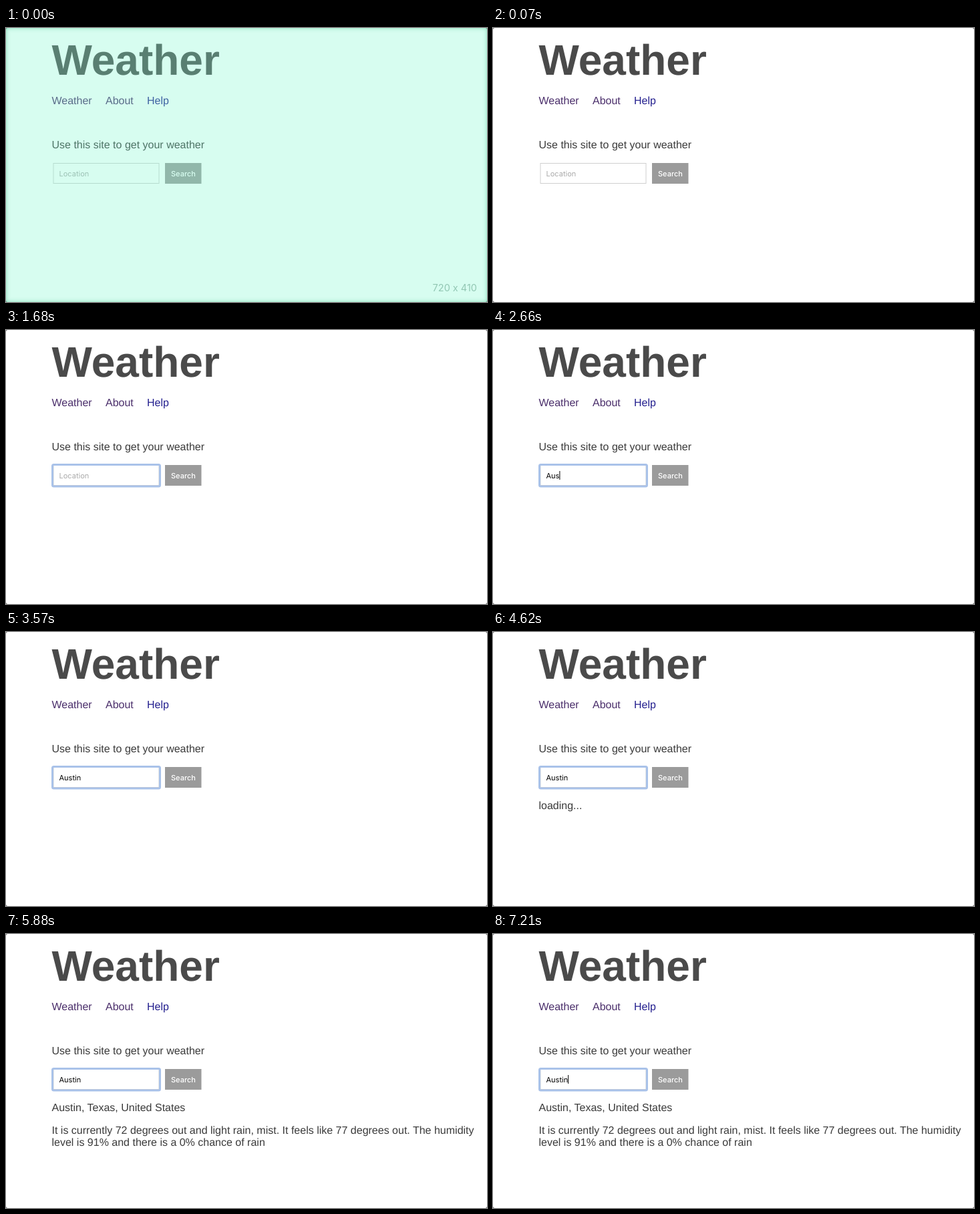
These frames come from a looping animation (720 px wide and 410 px high, 7.28 s). An HTML page:

```html
<!DOCTYPE html>
<html lang="en">
<head>
<meta charset="utf-8">
<title>Weather</title>
<style>
  html, body { margin: 0; width: 100%; height: 100%; overflow: hidden; background: #fff; }
  svg { position: absolute; left: 0; top: 0; display: block; }
  text { font: 16px "Liberation Sans", Arial, sans-serif; fill: #3a3a3a; text-rendering: geometricPrecision; }
  .title { font-size: 64px; font-weight: bold; fill: #4a4a4a; }
  .visited { fill: #4b2f6b; }
  .link { fill: #24208f; }
  .control { font: 11px Inter, sans-serif; }
  #flash {
    position: absolute; left: 0; top: 0; width: 720px; height: 410px;
    background: rgba(122, 248, 205, .3);
    box-shadow: inset 0 0 6px rgba(90, 205, 155, .65);
  }
  #flash span {
    position: absolute; right: 15px; top: 380px;
    font: 14.5px/18px Inter, sans-serif; color: #92c7b3;
  }
</style>
</head>
<body>
<svg width="720" height="410" viewBox="0 0 720 410">
  <path d="M0 0h2L0 2zM720 0v2l-2-2zM0 410v-2l2 2zM720 410h-2l2-2z" fill="#888"/>
  <text class="title" x="68.5" y="70">Weather</text>
  <text class="visited" x="68.5" y="114">Weather</text>
  <text class="visited" x="149" y="114">About</text>
  <text class="link" x="211" y="114">Help</text>
  <text x="68.5" y="180">Use this site to get your weather</text>

  <rect x="71" y="202.5" width="158" height="30" fill="#fff" stroke="#cfcfcf"/>
  <rect id="ring" fill="none" stroke="#a9c2e9" stroke-width="3"/>
  <text id="field" class="control" x="79.5" y="222"></text>
  <rect id="caret" y="211" width="1" height="13" fill="#000"/>

  <rect x="238" y="202" width="54.5" height="31" fill="#9b9b9b"/>
  <text class="control" x="247" y="222" style="fill:#fff;font-weight:500">Search</text>

  <text id="loading" x="68.5" y="265">loading...</text>
  <g id="result">
    <text x="68.5" y="265">Austin, Texas, United States</text>
    <text x="68.5" y="299">It is currently 72 degrees out and light rain, mist. It feels like 77 degrees out. The humidity</text>
    <text x="68.5" y="317">level is 91% and there is a 0% chance of rain</text>
  </g>
</svg>
<div id="flash"><span>720 x 410</span></div>

<script>
const LOOP = 7280, STEP = 70;
const FOCUS = 980, SUBMIT = 3710, RESPONSE = 4760;
const BLINK = 1050, CARET_ON = 560;
const WORD = "Austin";
const KEY_TIMES = [2240, 2450, 2590, 2730, 2870, 3010];

const el = id => document.getElementById(id);
const show = (id, visible) => { el(id).style.display = visible ? "" : "none"; };

function drawRing(t) {
  show("ring", t >= FOCUS);
  const progress = Math.min(1, (t - FOCUS + STEP) / (4 * STEP));
  const spread = 1.5 * (1 - progress);
  const box = { x: 69.5 - spread, y: 201.5 - spread, width: 161 + 2 * spread, height: 32.5 + 2 * spread, rx: 2 + spread };
  for (const [name, value] of Object.entries(box)) el("ring").setAttribute(name, value);
  el("ring").style.opacity = Math.max(0, progress);
}

function drawField(t) {
  const typed = KEY_TIMES.filter(time => time <= t).length;
  const field = el("field");
  field.textContent = typed ? WORD.slice(0, typed) : "Location";
  field.style.fill = typed ? "#000" : "#aaa";

  // Each key press restarts the blink; the first wake is a little late.
  const lastKey = typed ? KEY_TIMES[typed - 1] : t >= 2100 ? 2100 : FOCUS;
  show("caret", t >= FOCUS && (t - lastKey) % BLINK < CARET_ON &&
    !(typed === 0 && t > FOCUS + CARET_ON && t < 2100));
  el("caret").setAttribute("x", typed ? 79.5 + field.getComputedTextLength() : 79.5);
}

function render(now) {
  const t = Math.floor((now % LOOP) / STEP) * STEP;
  show("flash", t < STEP);
  drawRing(t);
  drawField(t);
  show("loading", t >= SUBMIT && t < RESPONSE);
  show("result", t >= RESPONSE);
}

const start = performance.now();
function tick() {
  render(performance.now() - start);
  requestAnimationFrame(tick);
}
tick();
</script>
</body>
</html>
```
